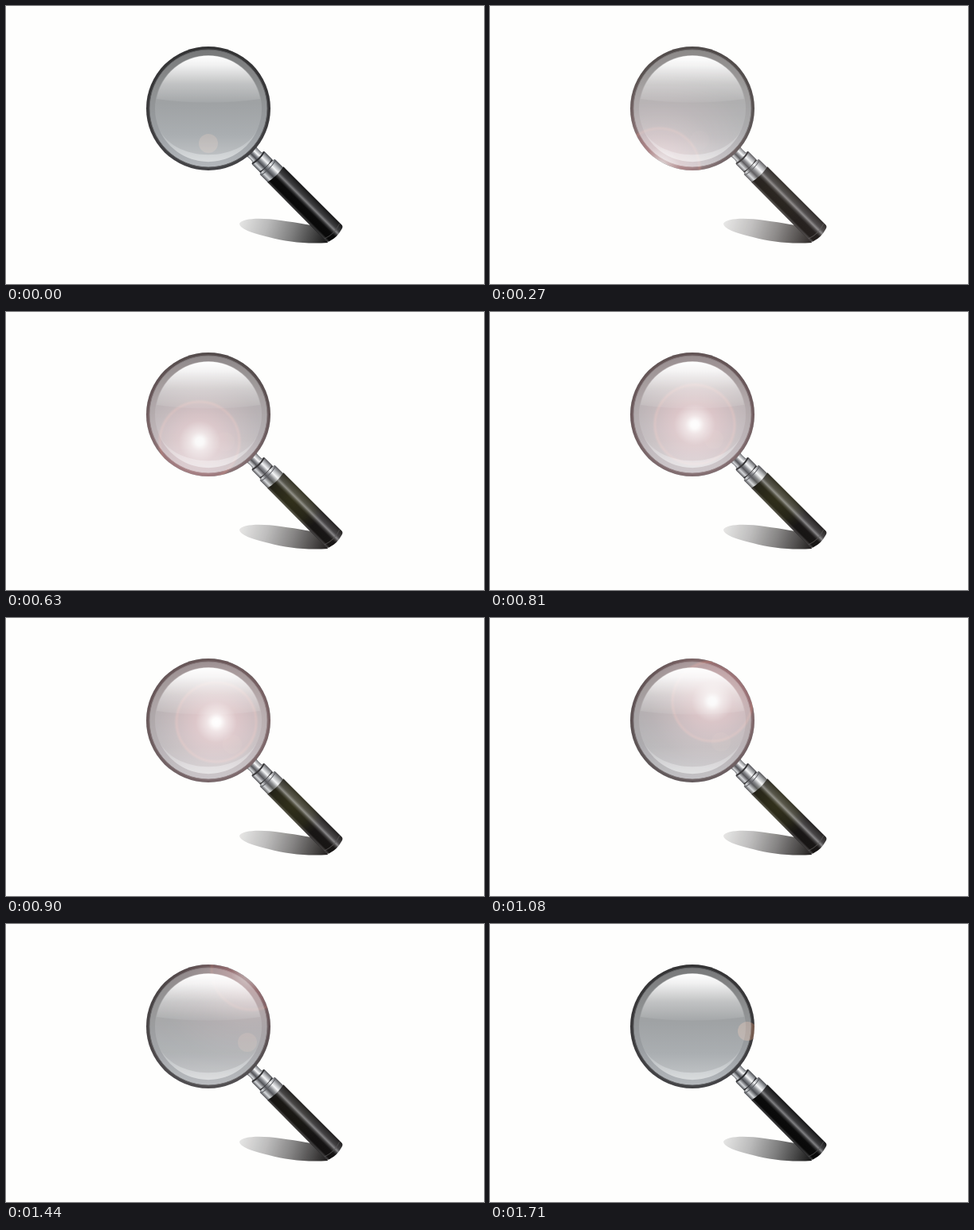
These frames come from a looping animation (600 px wide and 350 px high, 1.8 s). An HTML page:

```html
<!DOCTYPE html>
<html lang="en">
<head>
<meta charset="utf-8">
<title>Magnifying glass</title>
<style>
  html, body { margin: 0; width: 100%; height: 100%; overflow: hidden; background: #fefefd; }
  svg { display: block; width: 600px; height: 350px; }
  .light { mix-blend-mode: screen; }
</style>
</head>
<body>
<svg viewBox="0 0 600 350">
  <defs>
    <linearGradient id="rim" x2="0" y2="1">
      <stop offset="0" stop-color="#333334"/>
      <stop offset=".5" stop-color="#3a393b"/>
      <stop offset="1" stop-color="#444447"/>
    </linearGradient>
    <linearGradient id="bevel" x2="0" y2="1">
      <stop offset="0" stop-color="#777879"/>
      <stop offset=".35" stop-color="#8e9091"/>
      <stop offset=".7" stop-color="#9a9ea2"/>
      <stop offset="1" stop-color="#b4b8bc"/>
    </linearGradient>
    <linearGradient id="glass" x2="0" y2="1">
      <stop offset="0" stop-color="#a2a3a3"/>
      <stop offset=".45" stop-color="#9fa2a4"/>
      <stop offset=".75" stop-color="#aaaeb1"/>
      <stop offset="1" stop-color="#c3c6c8"/>
    </linearGradient>
    <linearGradient id="shine" x2="0" y2="1">
      <stop offset="0" stop-color="#fff"/>
      <stop offset=".2" stop-color="#fff" stop-opacity=".85"/>
      <stop offset=".6" stop-color="#fff" stop-opacity=".35"/>
      <stop offset="1" stop-color="#fff" stop-opacity=".06"/>
    </linearGradient>
    <linearGradient id="crescent" x2="0" y2="1">
      <stop offset="0" stop-color="#dfe3e6" stop-opacity="0"/>
      <stop offset="1" stop-color="#e4e7e8" stop-opacity=".65"/>
    </linearGradient>
    <linearGradient id="steel" x2="0" y2="1">
      <stop offset="0" stop-color="#4c4e52"/>
      <stop offset=".16" stop-color="#a4a7ab"/>
      <stop offset=".34" stop-color="#f5f6f7"/>
      <stop offset=".5" stop-color="#85888d"/>
      <stop offset=".64" stop-color="#4b4d52"/>
      <stop offset=".84" stop-color="#d4d7da"/>
      <stop offset="1" stop-color="#484a4f"/>
    </linearGradient>
    <linearGradient id="grip" x2="0" y2="1">
      <stop offset="0" stop-color="#161617"/>
      <stop offset=".12" stop-color="#29292a"/>
      <stop offset=".28" stop-color="#3e3e40"/>
      <stop offset=".39" stop-color="#808082"/>
      <stop offset=".48" stop-color="#343435"/>
      <stop offset=".58" stop-color="#0b0b0b"/>
      <stop offset=".86" stop-color="#090909"/>
      <stop offset=".95" stop-color="#363637"/>
      <stop offset="1" stop-color="#242425"/>
    </linearGradient>
    <linearGradient id="shadow" gradientUnits="userSpaceOnUse" x1="298" y1="262" x2="402" y2="298">
      <stop offset="0" stop-color="#e4e4e3"/>
      <stop offset=".3" stop-color="#bababa"/>
      <stop offset=".6" stop-color="#7e7e7e"/>
      <stop offset=".85" stop-color="#404040"/>
      <stop offset="1" stop-color="#181818"/>
    </linearGradient>
    <radialGradient id="halo">
      <stop offset="0" stop-color="#fff"/>
      <stop offset=".025" stop-color="#fbf6f5"/>
      <stop offset=".06" stop-color="#d4b0b1"/>
      <stop offset=".13" stop-color="#9c5a5e"/>
      <stop offset=".235" stop-color="#764448"/>
      <stop offset=".25" stop-color="#904d48"/>
      <stop offset=".265" stop-color="#5c3b3d"/>
      <stop offset=".39" stop-color="#392325"/>
      <stop offset=".6" stop-color="#15100f"/>
      <stop offset="1" stop-color="#000"/>
    </radialGradient>
    <radialGradient id="olive">
      <stop offset="0" stop-color="#1b1c06"/>
      <stop offset=".6" stop-color="#121304"/>
      <stop offset="1" stop-color="#000"/>
    </radialGradient>
    <clipPath id="lens"><circle cx="254" cy="129" r="78"/></clipPath>
  </defs>

  <rect width="600" height="350" fill="#fefefd"/>
  <path fill="url(#shadow)" d="M293 274 C296 267 320 266 345 270 C368 273 386 276 396 280 L404 298 C378 300 352 297 330 291 C308 286 293 280 293 274Z"/>

  <g transform="translate(254 129) rotate(45)">
    <path fill="url(#steel)" d="M75 -9 Q82 -7 89 -9 V9 Q82 7 75 9Z"/>
    <rect x="87" y="-11.5" width="17" height="22.5" rx="2" fill="url(#steel)"/>
    <path d="M88 -11 Q91 0 88 10 M102.5 -11 Q105.5 0 102.5 11" fill="none" stroke="#2c2d30" stroke-width="2"/>
    <rect x="103.5" y="-14" width="18" height="27" rx="2" fill="url(#steel)"/>
    <path d="M106 -13 Q109 0 106 13" fill="none" stroke="#55585d"/>
    <path fill="url(#grip)" d="M118.5 -14.8 H222 Q225.500 -14.500 226 -10 Q229 0 226 9 Q225.500 13.500 222 13.800 L118 13.300 Q121.500 0 118.500 -14.800Z"/>
    <path d="M219 -14 Q224 0 219 13" fill="none" stroke="#555" stroke-opacity=".65"/>
  </g>

  <circle cx="254" cy="129" r="78" fill="url(#rim)"/>
  <circle cx="254" cy="129" r="74" fill="url(#bevel)" stroke="#626365"/>
  <circle cx="254" cy="129" r="67" fill="url(#glass)"/>
  <path fill="url(#crescent)" d="M190 149 A67 67 0 0 0 318 149 C302 200 206 200 190 149Z"/>
  <path fill="url(#shine)" d="M189 117 A66 66 0 0 1 319 117 Q254 126 189 117Z"/>

  <rect id="veil" class="light" x="170" y="45" width="260" height="260" fill="#201a18"/>
  <circle id="tint" class="light" cx="360" cy="235" r="42" fill="url(#olive)"/>
  <g class="light" clip-path="url(#lens)">
    <circle id="flare" r="200" fill="url(#halo)"/>
  </g>
  <circle id="ghost" class="light" r="12" fill="#4a2a18"/>
</svg>
<script>
  const FRAME_MS = 90, FRAMES = 20;

  // Each key: frame, then values
  const flareKeys = [
    [0, 188, 240, 0], [3, 213, 204, .85], [7, 243, 163, .95], [10, 264, 131, 1],
    [12, 279, 105, .95], [16, 308, 58, .75], [19, 330, 20, .02]
  ];
  const ghostKeys = [[0, 254, 173, .7], [3, 263, 169, .1], [12, 290, 156, .2], [16, 303, 149, .5], [19, 323, 135, 1]];
  const veilKeys = [[0, 0], [3, .9], [7, .45], [12, .45], [16, .3], [19, 0]];
  const tintKeys = [[0, 0], [3, .2], [7, 1], [12, 1], [16, .2], [19, 0]];

  function sample(keys, frame) {
    const next = Math.max(1, keys.findIndex(key => key[0] >= frame));
    const a = keys[next - 1], b = keys[next];
    const mix = (frame - a[0]) / (b[0] - a[0]);
    return a.slice(1).map((value, i) => value + (b[i + 1] - value) * mix);
  }

  const part = id => document.getElementById(id);
  const flare = part('flare'), ghost = part('ghost'), veil = part('veil'), tint = part('tint');

  function place(node, [x, y, opacity]) {
    node.setAttribute('cx', x);
    node.setAttribute('cy', y);
    node.style.opacity = opacity;
  }

  function draw() {
    const frame = Math.floor(performance.now() / FRAME_MS) % FRAMES;
    place(flare, sample(flareKeys, frame));
    place(ghost, sample(ghostKeys, frame));
    veil.style.opacity = sample(veilKeys, frame)[0];
    tint.style.opacity = sample(tintKeys, frame)[0];
    requestAnimationFrame(draw);
  }
  draw();
</script>
</body>
</html>
```
